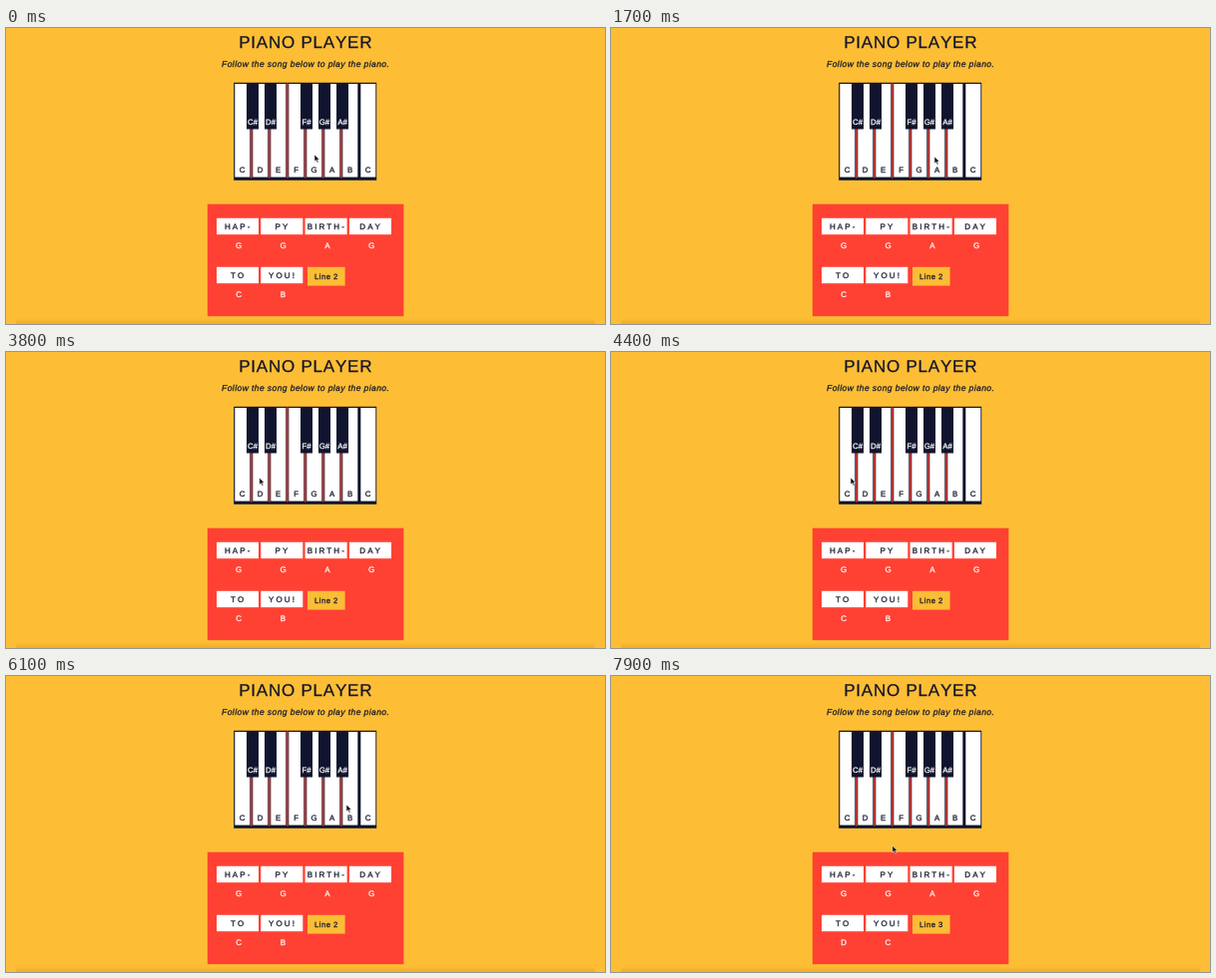
These frames come from a looping animation (600 by 297 pixels, 8000 ms). An HTML page:

```html
<!DOCTYPE html>
<html>
<head>
<meta charset="utf-8">
<style>
html, body { margin: 0; width: 100%; height: 100%; overflow: hidden; background: #fdbe35; }
svg { display: block; width: 600px; height: 297px; font-family: "Liberation Sans", Arial, sans-serif; font-kerning: none; }
text { text-rendering: geometricPrecision; stroke-width: .25px; }
</style>
</head>
<body>
<svg id="stage" viewBox="0 0 600 297">
  <defs>
    <linearGradient id="shade" x2="0" y2="1">
      <stop offset="0" stop-color="#e09a20" stop-opacity="0"/>
      <stop offset="1" stop-color="#e09a20" stop-opacity=".5"/>
    </linearGradient>
  </defs>
  <rect width="600" height="297" fill="#fdbe35"/>
  <rect x="10" y="291" width="580" height="6" fill="url(#shade)"/>
</svg>
<script>
const stage = document.getElementById('stage');
const INK = '#12142a', NAVY = '#10142e', RED = '#ff4133';

function add(tag, attrs, text = '') {
  const el = document.createElementNS('http://www.w3.org/2000/svg', tag);
  for (const k in attrs) el.setAttribute(k, attrs[k]);
  el.textContent = text;
  stage.appendChild(el);
  return el;
}
const rect = (x, y, width, height, fill) => add('rect', { x, y, width, height, fill });

// Text centred on x, without counting the spacing after the last letter
const label = (text, x, y, size, fill = INK, gap = 0, more = {}) =>
  add('text', { x: x + gap / 2, y, 'font-size': size, fill, stroke: fill, 'letter-spacing': gap, 'text-anchor': 'middle', ...more }, text);

label('PIANO PLAYER', 299.8, 20.2, 17, INK, 0.78);
label('Follow the song below to play the piano.', 300, 39, 8.5, INK, 0.425, { 'font-style': 'italic' });

// Keyboard
rect(228.2, 54.8, 143, 98, NAVY);
[...'CDEFGABC'].forEach((note, i) => {
  const x = 229.3 + 18 * i;
  rect(x, 56, 15, 93.6, '#fff');
  if (i < 6) rect(x + 15.6, 55.5, 1.8, 95, '#c83a34');
  label(note, x + 7.3, 144.8, 7.8);
});
[['C#', 247], ['D#', 265], ['F#', 301], ['G#', 319], ['A#', 337]].forEach(([note, x]) => {
  rect(x - 6, 55, 12, 46.5, NAVY);
  label(note, x, 97, 7.8, '#fff');
});

// Song panel
rect(201.8, 176.7, 196.5, 112.5, RED);
const notes = [];
['HAP-', 'PY', 'BIRTH-', 'DAY', 'TO', 'YOU!'].forEach((word, i) => {
  const x = 232 + 44.3 * (i % 4), y = i < 4 ? 190.8 : 239.8;
  rect(x - 21, y, 42, 16.4, '#fff');
  label(word, x - 0.3, y + 11.4, 8, INK, 2.1);
  notes.push(label('GGAGCB'[i], x + 1.2, y + 30.6, 8, '#fff'));
});
rect(302, 239.8, 37.6, 18.8, '#fbbd36');
const button = label('Line 2', 320.7, 252, 7.6, INK, 0.5);

const cursor = add('path', {
  d: 'M0 0V7L1.6 5.6L2.8 8.2L4 7.6L2.8 5.1H5Z',
  fill: '#111', stroke: '#fff', 'stroke-width': 0.5
});

// Pointer rests: [time, x, y]
const path = [
  [0, 309, 127], [1200, 309, 127], [1600, 324, 129], [2200, 324, 129],
  [2600, 309.5, 126.7], [3300, 309.5, 126.7], [4000, 240, 126], [4800, 240, 126],
  [5600, 341, 129], [6300, 341, 129], [6800, 330, 235], [7400, 330, 235], [8000, 278, 165]
];

function draw(now) {
  const t = Math.floor(now % 8000 / 100) * 100;
  const i = path.findIndex(p => p[0] > t);
  const [t0, x0, y0] = path[i - 1], [t1, x1, y1] = path[i];
  const u = (t - t0) / (t1 - t0), e = u * u * (3 - 2 * u);
  cursor.setAttribute('transform', `translate(${x0 + (x1 - x0) * e} ${y0 + (y1 - y0) * e})`);

  const clicked = t >= 7300;
  button.textContent = clicked ? 'Line 3' : 'Line 2';
  notes[4].textContent = clicked ? 'D' : 'C';
  notes[5].textContent = clicked ? 'C' : 'B';
}

let start;
function tick(now) {
  start ??= now;
  draw(now - start);
  requestAnimationFrame(tick);
}
draw(0);
requestAnimationFrame(tick);
</script>
</body>
</html>
```
